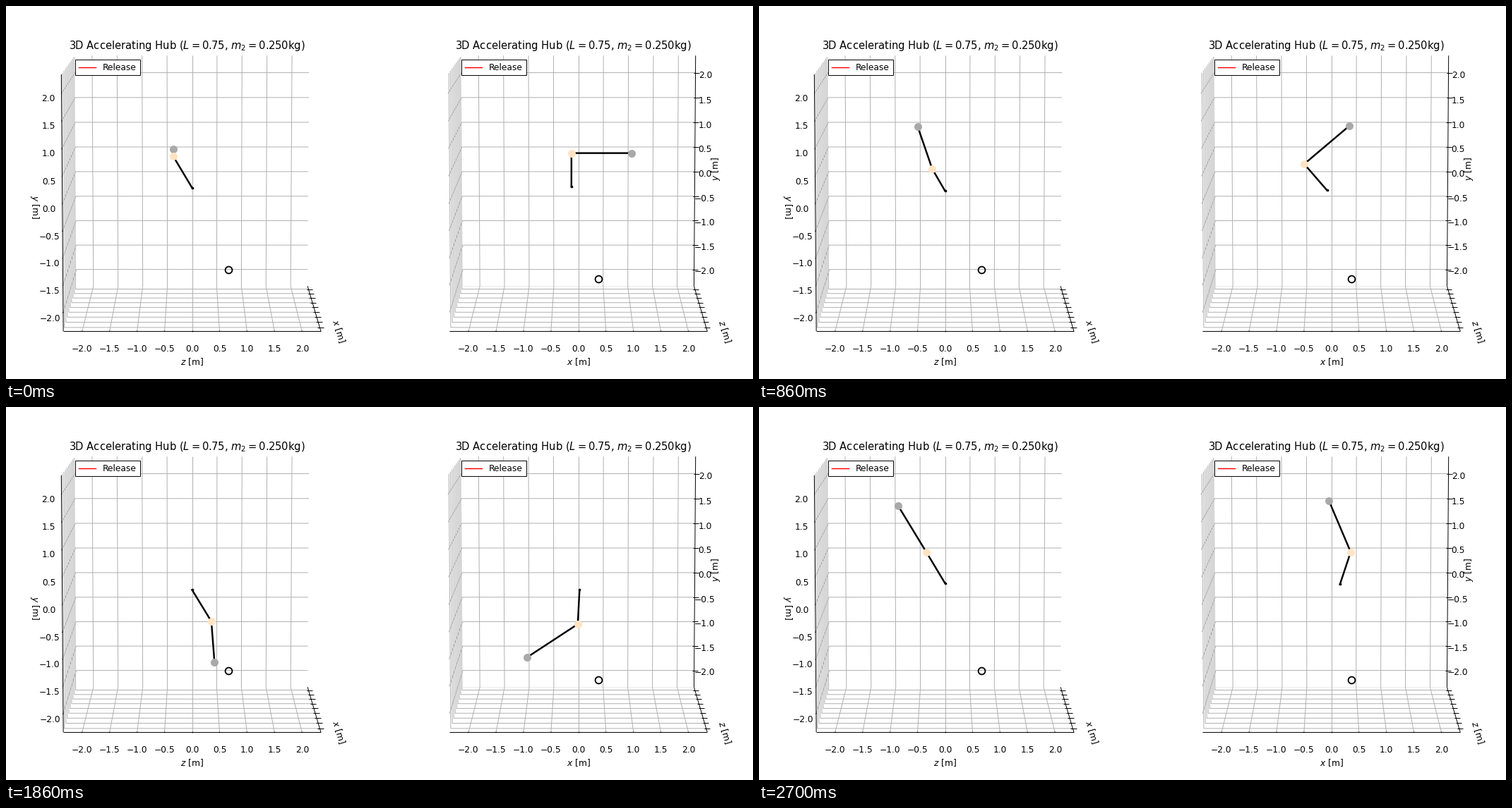
These frames come from a looping animation (1058x529 px, 2720 ms). A matplotlib script:

```python
import numpy as np
import matplotlib.pyplot as plt
from matplotlib.animation import FuncAnimation
from matplotlib.collections import LineCollection
from matplotlib.patches import Rectangle

WIDTH, HEIGHT = 1058, 529
FRAMES, INTERVAL = 136, 20

# Perspective box: half extent in metres, camera 10 units away, 7.5 degrees up
HALF = 2.25 * 25 / 24
UNIT = 0.55 / HALF
SCALE = 315.9
ELEV = np.radians(7.5)
CENTER_Y = 256.4
LEFT, RIGHT = 263.5, 810.8
TICKS = np.arange(-2, 2.1, 0.5)

# Arm geometry in metres
ARM_X, ARM_Y, ARM_Z, ARM2 = 0.71, 0.607, 0.355, 1.155
TARGET = (0.37, -1.67, 0.704)


def project(center, across, up, near):
    """Metres (right, up, towards the viewer) to stage pixels."""
    a, u, n = across * UNIT, up * UNIT, near * UNIT
    height = u * np.cos(ELEV) - n * np.sin(ELEV)
    depth = n * np.cos(ELEV) + u * np.sin(ELEV)
    zoom = SCALE / (1 - depth / 10)
    return center + a * zoom, CENTER_Y - height * zoom


def hermite(times, values):
    """Smooth curve through a few keys."""
    times, values = np.array(times), np.array(values)
    slopes = np.gradient(values, times, edge_order=2)

    def curve(t):
        i = min(np.searchsorted(times, t, side="right") - 1, len(times) - 2)
        h = times[i + 1] - times[i]
        s = (t - times[i]) / h
        return ((1 + 2 * s) * (1 - s) ** 2 * values[i]
                + s * (1 - s) ** 2 * h * slopes[i]
                + s * s * (3 - 2 * s) * values[i + 1]
                + s * s * (s - 1) * h * slopes[i + 1])

    return curve


KEYS = [0, 0.52, 0.86, 1.28, 1.86, 2.36, 2.7]
hub_x = hermite(KEYS, [-0.135, -0.115, -0.085, -0.034, 0.02, 0.088, 0.162])
hub_y = hermite(KEYS, [0, -0.049, -0.068, -0.068, -0.042, 0.012, 0.067])
arm_angle = hermite(KEYS, [0, 13.9, 38.05, 85.6, 177.3, 264.3, 343])
arm_lean = hermite(KEYS, [-0.005, 0.021, 0.038, 0.03, 0.015, -0.01, -0.0225])
tip_angle = hermite([0, 0.52, 0.86, 1.28, 1.64, 1.86, 2.16, 2.36, 2.7],
                    [0, 14.4, 39.2, 86.3, 143, 213.2, 320, 396.5, 474])
tip_z = hermite([0, 0.52, 0.86, 1.28, 1.64, 1.86, 2.0, 2.16, 2.36, 2.7],
                [0, -0.166, -0.282, -0.393, -0.3675, 0.051, 0.27, 0.22,
                 -0.021, -0.532])


def pose(t):
    """Hub, joint and tip as (x, y, z) in metres."""
    hub = np.array([hub_x(t), hub_y(t), 0])
    a = np.radians(arm_angle(t))
    joint = hub + [-ARM_X * np.sin(a), ARM_Y * np.cos(a),
                   -ARM_Z * np.cos(a) + arm_lean(t)]
    b, z = np.radians(tip_angle(t)), tip_z(t)
    reach = np.sqrt(ARM2 ** 2 - z * z)
    tip = joint + [reach * np.cos(b), reach * np.sin(b), z]
    return np.array([hub, joint, tip])


def side_view(points):
    x, y, z = np.transpose(points)
    return project(LEFT, z, y, -x)


def front_view(points):
    x, y, z = np.transpose(points)
    return project(RIGHT, x, y, z)


plt.rcParams["font.family"] = "DejaVu Sans"
fig = plt.figure(figsize=(12, 6), dpi=529 / 6, facecolor="white")
ax = fig.add_axes([0, 0, 1, 1])
ax.set_xlim(0, WIDTH)
ax.set_ylim(HEIGHT, 0)
ax.axis("off")


def lines(center, paths, color, width=0.8, order=1):
    segments = [[project(center, *p) for p in path] for path in paths]
    ax.add_collection(LineCollection(segments, colors=color,
                                     linewidths=width, zorder=order))


def label(x, y, text, size=10, **style):
    style = {"ha": "center", "va": "center", **style}
    ax.text(x, y, text, fontsize=size, zorder=6, **style)


def draw_box(center, upright_at_back):
    h = HALF
    grid = []
    for v in TICKS:
        grid.append([(v, h, -h), (v, -h, -h), (v, -h, h)])
        grid.append([(h, v, -h), (-h, v, -h), (-h, v, h)])
        grid.append([(-h, h, v), (-h, -h, v), (h, -h, v)])
    lines(center, grid, "#b0b0b0")

    upright = (h, -h) if upright_at_back else (-h, h)
    lines(center, [[(-h, -h, h), (h, -h, h)],
                   [(h, -h, -h), (h, -h, h)],
                   [(upright[0], -h, upright[1]), (upright[0], h, upright[1])]],
          "black", order=2)

    inner, outer = h - 0.0375, h + 0.075
    marks = []
    for v in TICKS:
        marks.append([(v, -h, inner), (v, -h, outer)])
        marks.append([(inner, -h, v), (outer, -h, v)])
        if upright_at_back:
            marks.append([(inner, v, -h), (outer, v, -h)])
        else:
            marks.append([(-h, v, inner), (-h, v, outer)])
    lines(center, marks, "black", order=2)


def draw_panel(center, shift, across, depth):
    label(256 + shift, 61.5, "3D Accelerating Hub ($L = 0.75$, $m_2 = 0.250$kg)",
          12, va="baseline")
    ax.add_patch(Rectangle((97.7 + shift, 76), 92, 22, facecolor="white",
                           edgecolor="black", linewidth=0.8, zorder=5))
    ax.plot([102.5 + shift, 127 + shift], [86.5, 86.5], color="red",
            linewidth=1.2, zorder=6)
    label(137 + shift, 91, "Release", ha="left", va="baseline")
    for v in TICKS:
        label(center + 78 * v, 487, number(v))
    label(center, 505, f"${across}$ [m]")
    label(471 + shift, 461.5, f"${depth}$ [m]", rotation=-73)


def number(v):
    return f"{v:.1f}".replace("-", "\u2212")


draw_box(LEFT, False)
draw_box(RIGHT, True)
lines(RIGHT, [[(-HALF, -HALF, -HALF), (HALF, -HALF, -HALF)]], "#ececec", order=0)
draw_panel(LEFT, 0, "z", "x")
draw_panel(RIGHT, 547.2, "x", "z")
for v in TICKS:
    bow = 0.9 * (1 - v * v / 4)
    label(61 - v / 2, 287.3 - 78 * v + bow, number(v))
    label(990 + v / 2, 237.8 - 69.4 * v + bow, number(v))
label(40, 285, "$y$ [m]", rotation=-90)
label(1005, 231, "$y$ [m]", rotation=90)

views = []
for view in (side_view, front_view):
    rod, = ax.plot([], [], color="black", linewidth=2, zorder=7)
    pivot, = ax.plot([], [], "o", color="black", markersize=3, zorder=7,
                     markeredgewidth=0)
    tip, = ax.plot([], [], "o", color="darkgray", markersize=9, zorder=8,
                   markeredgewidth=0)
    joint, = ax.plot([], [], "o", color="bisque", markersize=9, zorder=9,
                     markeredgewidth=0)
    ax.plot(*view([TARGET]), "o", color="black", fillstyle="none",
            markersize=8, markeredgewidth=1.5, zorder=7)
    views.append((view, rod, (pivot, joint, tip)))


def update(frame):
    points = pose(frame * INTERVAL / 1000)
    artists = []
    for view, rod, dots in views:
        xs, ys = view(points)
        rod.set_data(xs, ys)
        for dot, x, y in zip(dots, xs, ys):
            dot.set_data([x], [y])
        artists += [rod, *dots]
    return artists


animation = FuncAnimation(fig, update, frames=FRAMES, interval=INTERVAL,
                          repeat=True, repeat_delay=0)
plt.show()
```
